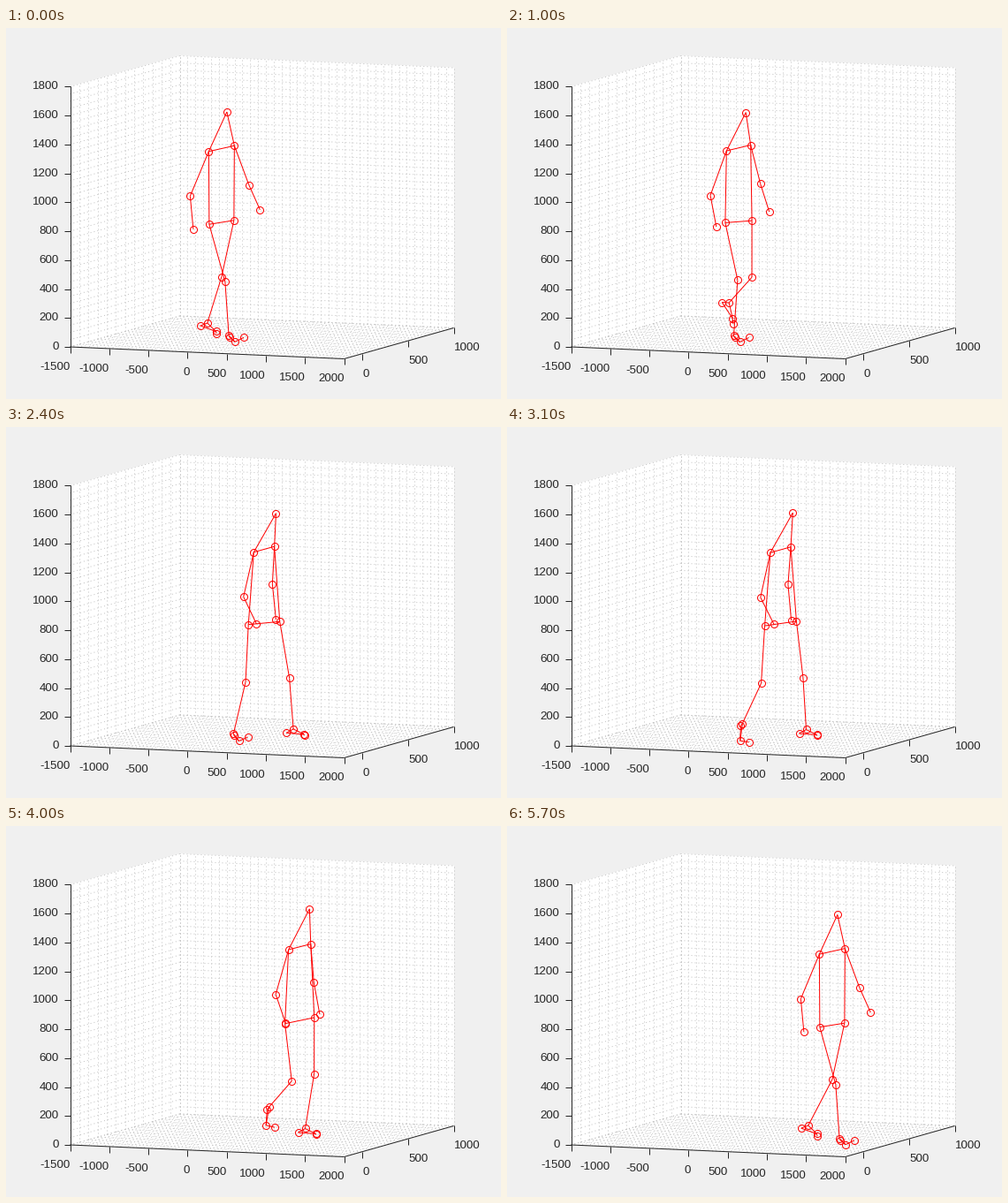
Write a matplotlib script that moves like this. It is 560 px wide and 420 px high and loops after 5800 ms.

```python
import numpy as np
import matplotlib.pyplot as plt
from matplotlib.animation import FuncAnimation
from matplotlib.collections import LineCollection

W, H, DPI = 560, 420, 100
PX = 72 / DPI
FRAMES, STEP = 58, 100
INK = "#262626"
XLIM, YLIM, ZLIM = (-1500, 2000), (-200, 1000), (0, 1800)
STRIDE = np.array([124, 5.4])  # screen distance covered in one loop

BONES = [("head", "shoulder_l"), ("head", "shoulder_r"),
         ("shoulder_l", "shoulder_r"), ("hip_l", "hip_r")]
for side in "_l", "_r":
    BONES += [(a + side, b + side) for a, b in (
        ("shoulder", "elbow"), ("elbow", "hand"), ("shoulder", "hip"),
        ("hip", "knee"), ("knee", "ankle"), ("ankle", "heel"),
        ("heel", "ball"), ("ankle", "ball"), ("ball", "toe"))]


def vec(x, y):
    return np.array([x, y], float)


def ease(u):
    u = np.clip(u, 0, 1)
    return u * u * (3 - 2 * u)


def pulse(u):
    return np.sin(np.pi * np.clip(u, 0, 1)) ** 2


def add_foot(p, side, start, step, lift_off, land, ankle, heel, toe):
    """Ball of the foot steps forward; the rest tilts about it.

    ankle, heel and toe are pairs: offset at rest, change when tilted.
    """
    s, span = p["phase"], land - lift_off
    steps = [(s + k - lift_off) / span for k in (0, 1)]
    gone = sum(ease(u) for u in steps) - 1
    lift = sum(pulse(1.5 * u) for u in steps)
    tilt = sum(pulse((s + k - lift_off + 0.15) / 0.5) for k in (-1, 0, 1))

    def offset(rest, change):
        return vec(*rest) + tilt * vec(*change)

    p["ball" + side] = start + step * gone - vec(0, 18 * lift)
    p["ankle" + side] = p["ball" + side] + offset(*ankle)
    p["heel" + side] = p["ankle" + side] + offset(*heel)
    p["toe" + side] = p["ball" + side] + offset(*toe)


def pose(s):
    """Joint positions at phase s of one stride, from 0 to 1."""
    a = 2 * np.pi * s
    c, d, c2 = np.cos(a), np.sin(a), np.cos(2 * a)
    p = {"phase": s}

    # Trunk: steady travel with sway and bob; shoulders twist against hips
    chest = (vec(243, 136) + STRIDE * s
             + vec(-3.5 * np.sin(a - 0.4), 0.8 * d - 3 * d * d))
    pelvis = chest + vec(0, 83.5)
    across = vec(26 + 3 * c, -6.5) / 2
    wide = vec(32 - 4 * c, -4.5 + 2.5 * d) / 2
    p["head"] = chest + vec(10 - 4 * c, -41.5 + 1.5 * d)
    p["shoulder_l"], p["shoulder_r"] = chest - across, chest + across
    p["hip_l"], p["hip_r"] = pelvis - wide, pelvis + wide

    # Arms and thighs swing about the joint above
    p["elbow_l"] = p["shoulder_l"] + vec(-16 - 5 * c, 50.5)
    p["hand_l"] = p["elbow_l"] + vec(9.5 - 6 * c, 34 + 3.5 * c)
    p["elbow_r"] = p["shoulder_r"] + vec(6.5 + 10 * c, 43.5 + c)
    p["hand_r"] = p["elbow_r"] + vec(8 + 4.5 * c, 34.5 - 6.5 * c)
    p["knee_l"] = p["hip_l"] + vec(8.5 + 11.5 * c - d - 2 * c2, 65)
    p["knee_r"] = p["hip_r"] + vec(-0.5 - 11.5 * c + 5 * d - 2 * c2, 64)

    add_foot(p, "_l", vec(264, 355), STRIDE, 0.53, 1.06,
             ankle=((-7, -7), (13, -17)), heel=((1, 2), (-4, 1)),
             toe=((10, -5), (0, 9)))
    add_foot(p, "_r", vec(238, 343), vec(113, 5), 0.06, 0.52,
             ankle=((-12, -6), (8, -12)), heel=((-8, 4.5), (0, -5)),
             toe=((0.5, 1), (0, 5)))
    del p["phase"]
    return p


def project(x, y, z):
    u, v, w = ((c - lo) / (hi - lo)
               for c, (lo, hi) in zip((x, y, z), (XLIM, YLIM, ZLIM)))
    return 73 + 310 * u + 124 * v, 360.5 + 13.5 * u - 35 * v - 294.5 * w


fig = plt.figure(figsize=(W / DPI, H / DPI), dpi=DPI, facecolor="#f0f0f0")
ax = fig.add_axes([0, 0, 1, 1])
ax.set_xlim(0.5, W + 0.5)
ax.set_ylim(H - 0.5, -0.5)
ax.axis("off")


def draw_box():
    (x0, x1), (y0, y1), (z0, z1) = XLIM, YLIM, ZLIM
    walls = [
        [(x0, y0, z0), (x1, y0, z0), (x1, y1, z0), (x0, y1, z0)],
        [(x0, y0, z0), (x0, y1, z0), (x0, y1, z1), (x0, y0, z1)],
        [(x0, y1, z0), (x1, y1, z0), (x1, y1, z1), (x0, y1, z1)],
    ]
    for wall in walls:
        ax.fill(*zip(*(project(*q) for q in wall)), color="white", lw=0.5)

    grid = []
    for x in range(x0, x1 + 1, 100):
        grid += [((x, y0, z0), (x, y1, z0)), ((x, y1, z0), (x, y1, z1))]
    for y in range(y0, y1 + 1, 100):
        grid += [((x0, y, z0), (x1, y, z0)), ((x0, y, z0), (x0, y, z1))]
    for z in range(z0, z1 + 1, 50):
        grid += [((x0, y0, z), (x0, y1, z)), ((x0, y1, z), (x1, y1, z))]
    ax.add_collection(LineCollection(
        [[project(*a), project(*b)] for a, b in grid],
        colors="#c2c2c2", linewidths=PX, linestyles=[(0, (1, 3))], zorder=2))


def draw_axes():
    (x0, x1), (y0, y1), (z0, z1) = XLIM, YLIM, ZLIM
    lines = [[project(x0, y0, z1), project(x0, y0, z0)],
             [project(x0, y0, z0), project(x1, y0, z0)],
             [project(x1, y0, z0), project(x1, y1, z0)]]

    def tick(at, value, dx, dy, tx, ty, ha):
        x, y = at
        lines.append([(x, y), (x + dx, y + dy)])
        ax.text(x + tx, y + ty, str(value), ha=ha, va="center", color=INK,
                family="Liberation Sans", size=13.33 * PX)

    for x in range(x0, x1 + 1, 500):
        tick(project(x, y0, z0), x, 0, 7, 0 if x else 3, 23, "right")
    for y in range(0, y1 + 1, 500):
        tick(project(x1, y, z0), y, 0, 7, 0.5, 23, "left")
    for z in range(z0, z1 + 1, 200):
        tick(project(x0, y0, z), z, -7, 0, -13, 0, "right")
    ax.add_collection(LineCollection(lines, colors=INK, linewidths=PX, zorder=3))


draw_box()
draw_axes()
bones = LineCollection([], colors="red", linewidths=PX, zorder=4)
ax.add_collection(bones)
dots, = ax.plot([], [], "o", ms=8 * PX, mfc="none", mec="red", mew=PX, zorder=5)


def update(n):
    p = pose(n / (FRAMES - 1))
    bones.set_segments([[p[a], p[b]] for a, b in BONES])
    dots.set_data(*np.transpose(list(p.values())))
    return bones, dots


anim = FuncAnimation(fig, update, frames=FRAMES, interval=STEP,
                     repeat=True, repeat_delay=0, blit=False)
plt.show()
```
